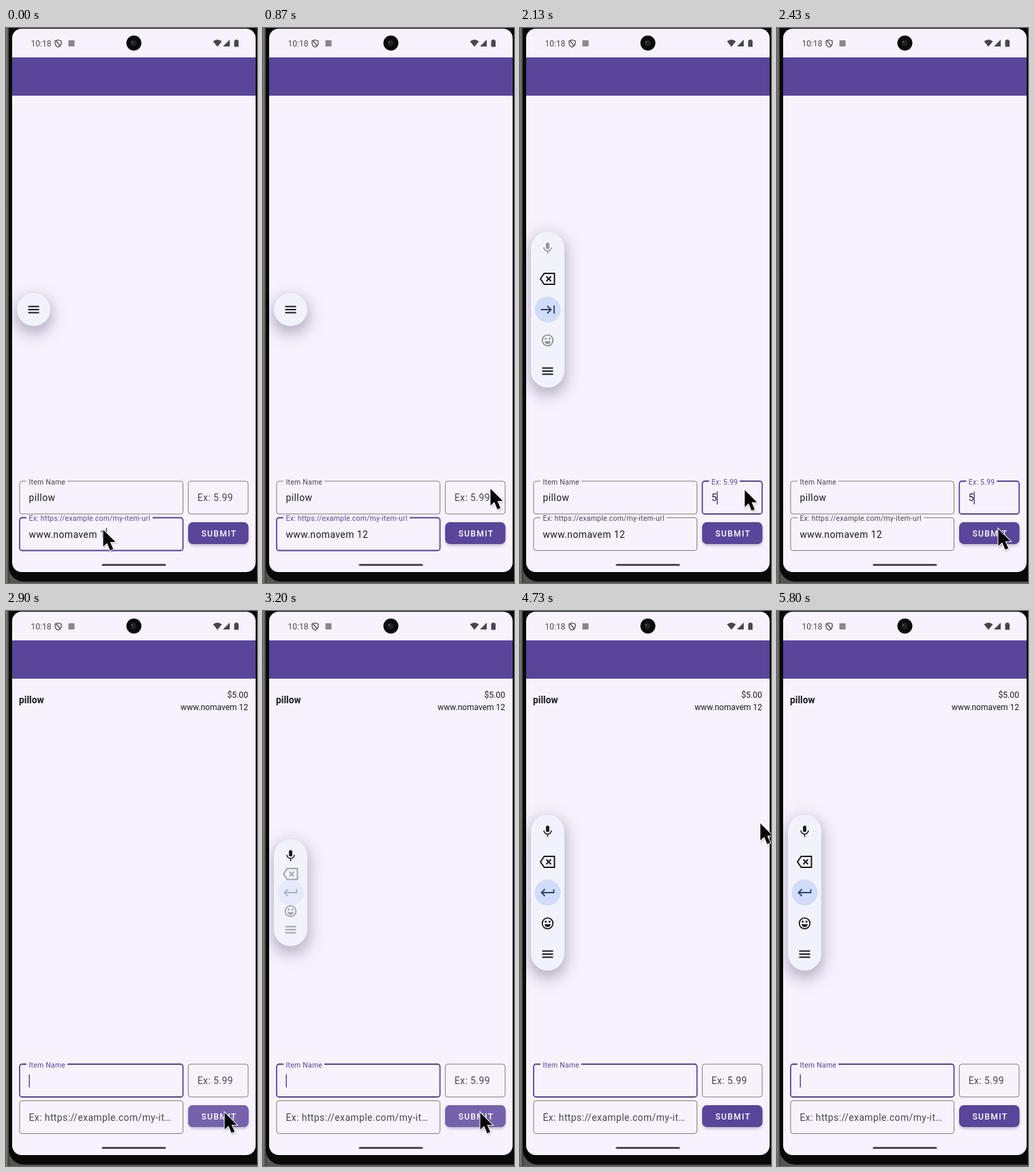
Recreate the animation shown at these times as an HTML page. Size 368x812 px, loop 5830 ms.

```html
<!DOCTYPE html>
<html lang="en">
<head>
<meta charset="utf-8">
<title>Wish list form</title>
<style>
  html, body { margin: 0; width: 100%; height: 100%; overflow: hidden; background: #55544f; }
  svg { display: block; width: 368px; height: 812px; }
  text { font-family: Roboto, Arial, sans-serif; fill: #1d1b20; white-space: pre; }
  .input { font-size: 13.9px; letter-spacing: .43px; }
  .line { fill: none; stroke: #1d1b20; stroke-width: 2; }
  .status { fill: #49454f; }
</style>
</head>
<body>
<svg viewBox="0 0 368 812">
  <defs>
    <clipPath id="screen"><rect x="9" y="1" width="357" height="795" rx="14"/></clipPath>
    <linearGradient id="edge"><stop stop-color="#85837c"/><stop offset="1" stop-color="#33322f"/></linearGradient>
  </defs>
  <rect width="5" height="812" fill="url(#edge)"/>
  <rect x="4" y="-30" width="400" height="840" rx="22" fill="#09090a"/>
  <g clip-path="url(#screen)">
    <rect width="368" height="812" fill="#f8f2fd"/>
    <rect y="43" width="368" height="56" fill="#59459a"/>

    <text x="36.5" y="26.5" font-size="12" style="fill:#49454f">10:18</text>
    <path d="M76.500 17.500l4.500 1.500v3.500q0 3.500-4.500 5.500q-4.500-2-4.500-5.500v-3.500zM73.500 19l6 7" fill="none" stroke="#49454f" stroke-width="1.300"/>
    <rect x="91.500" y="18" width="9" height="9" fill="#8a868c"/>
    <circle cx="187.500" cy="22" r="11" fill="#0b0b0d"/>
    <circle cx="187" cy="22" r="4.500" fill="#222226"/>
    <circle cx="185" cy="20.500" r="1" fill="#77767c"/>
    <path class="status" d="M303.500 19.500q6.500-5 13 0l-6.500 8zM328 17v10h-10z"/>
    <path class="status" d="M336 17h3.500v1.300h1.500v9.200h-6.500v-9.200h1.500z"/>

    <g id="entry">
      <text x="19" y="135" font-size="13.800" font-weight="700">pillow</text>
      <text x="355" y="126.500" font-size="12.200" text-anchor="end">$5.00</text>
      <text x="355" y="145" font-size="12" text-anchor="end">www.nomavem 12</text>
    </g>

    <g id="fields"></g>

    <rect x="268" y="726" width="87" height="31" rx="7" fill="#777280" opacity=".5" style="filter:blur(2px)"/>
    <rect id="button" x="267" y="723" width="88.500" height="32" rx="7" fill="#59459a"/>
    <rect id="ripple" x="267" y="723" width="88.500" height="32" rx="7" fill="#7661ac"/>
    <text x="286.500" y="743.500" font-size="12.200" font-weight="500" letter-spacing="1.250" style="fill:#fff">SUBMIT</text>

    <g id="bar">
      <rect id="halo" x="4" width="73" rx="36" fill="#a298b4" opacity=".26" style="filter:blur(9px)"/>
      <rect id="shade" x="15" width="52" rx="26" fill="#8a839c" opacity=".32" style="filter:blur(6px)"/>
      <rect id="pill" x="16" width="49" rx="24.500" fill="#f2f3fa"/>
      <g id="icons">
        <g>
          <rect x="-2.500" y="-8" width="5" height="9.500" rx="2.500" fill="#1d1b20"/>
          <path class="line" style="stroke-width:1.500" d="M-5.500-1a5.500 5.500 0 0 0 11 0M0 4.500v4"/>
        </g>
        <path class="line" d="M-10.500 0L-5-8H10V8H-5ZM-2-3.500l7 7m0-7l-7 7"/>
        <g>
          <circle r="19" fill="#d0dcfa"/>
          <path id="action" class="line" style="stroke:#2f4166;stroke-width:1.800"/>
        </g>
        <g>
          <circle class="line" r="7.800" style="stroke-width:1.800"/>
          <path d="M-4.500 1.300h9a4.500 4 0 0 1-9 0M-4.300-2.500a1.500 1.500 0 0 1 3 0a1.500 1.500 0 0 1-3 0m5.600 0a1.500 1.500 0 0 1 3 0a1.500 1.500 0 0 1-3 0" fill="#1d1b20"/>
        </g>
        <path class="line" d="M-8-4.500H8M-8 0H8M-8 4.500H8"/>
      </g>
    </g>
    <rect x="140.500" y="784" width="94" height="3" rx="1.500" fill="#504b58"/>
  </g>
  <g id="mouse">
    <path transform="translate(.5 1) scale(.9)" d="M0 0V27.500L6.300 21.800L11.300 33.500L16.300 31.300L11.300 20H20Z" fill="#050505" stroke="#fff" stroke-width="2.200" paint-order="stroke" style="filter:drop-shadow(1px 2px 1px #5554)"/>
  </g>
</svg>
<script>
const LOOP = 5830, PRICE_FOCUS = 1150, SUBMIT = 2750, KEY_2 = 200, KEY_5 = 2050;
const PURPLE = '#59459a';
const $ = id => document.getElementById(id);
const clamp = v => Math.max(0, Math.min(1, v));
const smooth = v => v * v * (3 - 2 * v);
const ramp = (t, from, to) => smooth(clamp((t - from) / (to - from)));
const set = (el, attrs) => { for (const k in attrs) el.setAttribute(k, attrs[k]); };
const add = (parent, tag, attrs) => {
  const el = document.createElementNS('http://www.w3.org/2000/svg', tag);
  set(el, attrs);
  return parent.appendChild(el);
};

function makeField(x, y, width, gap, label, shortLabel = label) {
  const g = $('fields');
  const box = add(g, 'rect', { x, y, width, height: 48, rx: 3.5, fill: 'none' });
  const notch = add(g, 'rect', { y: y - 3, height: 6, fill: '#f8f2fd' });
  const title = add(g, 'text', {});
  const value = add(g, 'text', { x: x + 13.5, y: y + 29.3, class: 'input' });
  const caret = add(g, 'rect', { y: y + 15, width: 1.5, height: 19, fill: PURPLE });

  // lift: 0 = placeholder inside the box, 1 = small label on the border
  return ({ text, lift, focus, caretX, caretOn }) => {
    set(box, { stroke: focus ? PURPLE : '#807b7c', 'stroke-width': focus ? 1.8 : 1 });
    set(notch, { x: x + 10 + gap / 2 * (1 - lift), width: gap * lift });
    set(title, { x: x + 13.5, y: y + 29 - 24.3 * lift });
    title.style.fontSize = 13.9 - 3.5 * lift + 'px';
    title.style.letterSpacing = .43 - .16 * lift + 'px';
    title.style.fill = focus ? PURPLE : '#49454f';
    title.textContent = lift < .5 ? shortLabel : label;
    value.textContent = text;
    set(caret, { x: caretX, opacity: focus && caretOn ? 1 : 0 });
  };
}

const nameField = makeField(20, 663, 239.5, 60, 'Item Name');
const urlField = makeField(20, 716.5, 239.5, 185, 'Ex: https://example.com/my-item-url', 'Ex: https://example.com/my-it…');
const priceField = makeField(267.3, 663, 87.7, 45, 'Ex: 5.99');

// time, x, y
const mousePath = [
  [300, 142, 733], [850, 333, 673], [1300, 333, 673], [2130, 329, 675], [2430, 324, 732],
  [3200, 318, 733], [3330, 318, 733], [3870, 316, 315], [4500, 316, 315], [4950, 385, 305]
];
function mouseAt(t) {
  let [, x, y] = mousePath[0];
  for (let i = 1; i < mousePath.length; i++) {
    const [from, px, py] = mousePath[i - 1], [to, nx, ny] = mousePath[i];
    const p = ramp(t, from, to);
    x += (nx - px) * p;
    y += (ny - py) * p;
  }
  return [x, y];
}

// Collapsed at first; each new focus hides the bar and unfolds a fresh one.
function drawBar(t) {
  const second = t > 2600, focusAt = second ? SUBMIT : PRICE_FOCUS;
  const fresh = t > focusAt + 200;
  const open = ramp(t, focusAt + 320, focusAt + 550);
  const gap = 45 * open, h = 48 + 4 * gap, top = 412 - h / 2;
  const typing = second ? 0 : ramp(t, KEY_5 + 150, KEY_5 + 330);
  $('bar').style.opacity = fresh ? ramp(t, focusAt + 280, focusAt + 350) - typing
    : second ? 0 : 1 - ramp(t, focusAt, focusAt + 100);
  set($('pill'), { y: top, height: h });
  set($('shade'), { y: top + 7, height: h + 3 });
  set($('halo'), { y: top - 4, height: h + 24 });
  set($('action'), { d: second ? 'M9-5V0H-9M-4-5L-9 0L-4 5' : 'M-10 0H5M-.5-5.500L5 0L-.5 5.500M9.500-6V6' });
  const shown = open ** 2;
  const alpha = !fresh ? [0, 0, 0, 0, 1]
    : second ? [1, shown, shown, shown, shown]
    : [.45, shown, shown, shown * .45, shown];
  [...$('icons').children].forEach((icon, i) =>
    set(icon, { transform: `translate(40.5 ${412 + (i - 2) * gap})`, opacity: alpha[i] }));
}

function draw(t) {
  const sent = t >= SUBMIT, onPrice = t >= PRICE_FOCUS && !sent;
  const drop = 1 - ramp(t, SUBMIT, SUBMIT + 150);
  const lastEdit = sent ? SUBMIT : t >= KEY_5 ? KEY_5 : onPrice ? PRICE_FOCUS : t >= KEY_2 ? KEY_2 : 0;
  const caretOn = (t - lastEdit) % 1000 < 500;
  const typed2 = t >= KEY_2, typed5 = t >= KEY_5 && !sent;

  nameField({ text: sent ? '' : 'pillow', lift: 1, focus: sent, caretX: 33.5, caretOn });
  urlField({
    text: sent ? '' : 'www.nomavem 1' + (typed2 ? '2' : ''), lift: drop,
    focus: t < PRICE_FOCUS, caretX: typed2 ? 155.5 : 146.5, caretOn
  });
  priceField({
    text: typed5 ? '5' : '', lift: ramp(t, PRICE_FOCUS, PRICE_FOCUS + 150) * drop,
    focus: onPrice, caretX: typed5 ? 288.5 : 281, caretOn
  });
  $('entry').style.opacity = sent ? 1 : 0;
  $('ripple').style.opacity = ramp(t, 2680, 2780) - ramp(t, 3250, 3400);
  drawBar(t);
  set($('mouse'), { transform: `translate(${mouseAt(t)})`, opacity: t < 4950 ? 1 : 0 });
}

const began = performance.now();
function tick() {
  draw((performance.now() - began) % LOOP);
  requestAnimationFrame(tick);
}
tick();
</script>
</body>
</html>
```
